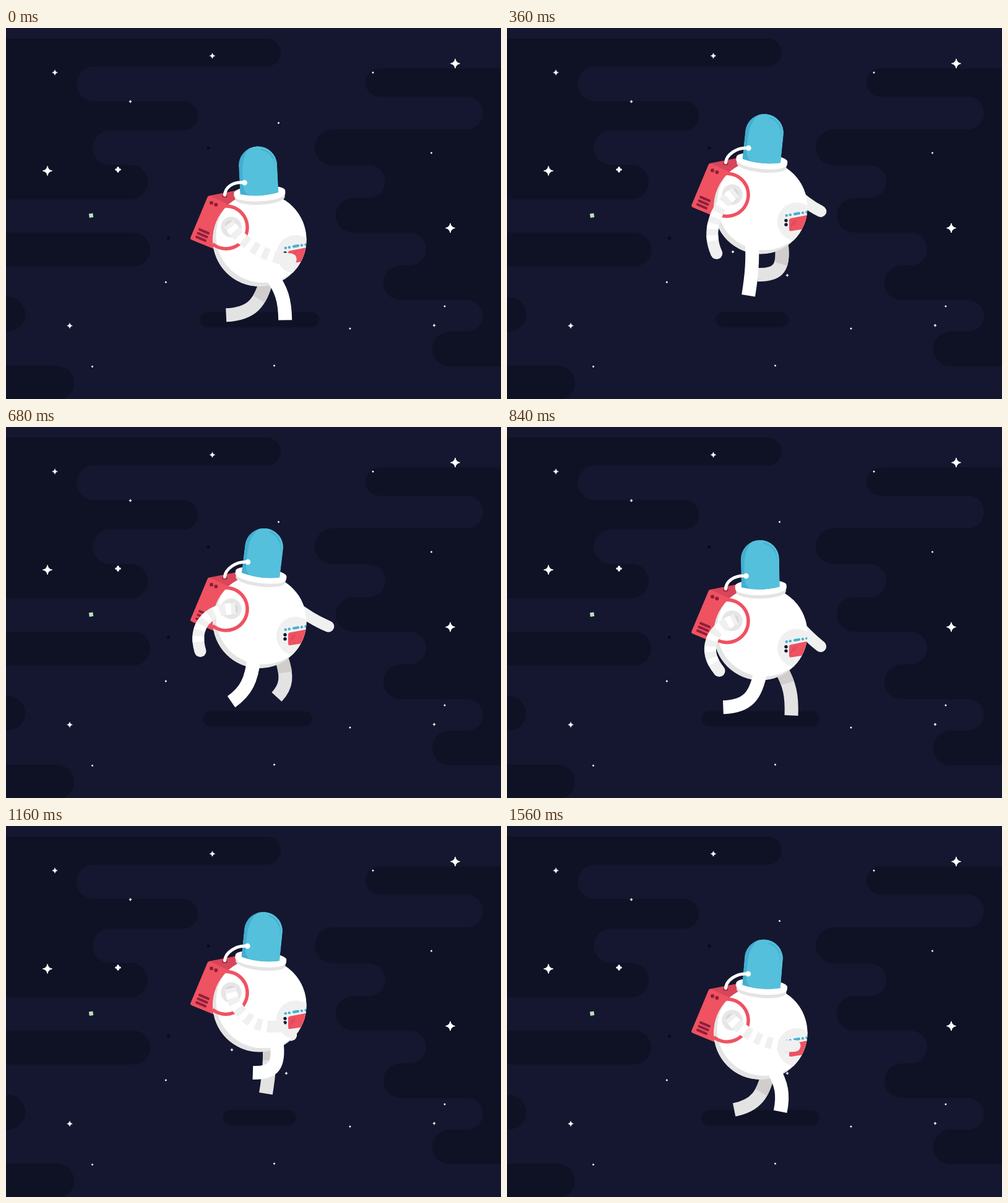
An HTML page that plays this animation: 800x600 px, repeating every 1600 ms.

```html
<!DOCTYPE html>
<html lang="en">
<head>
<meta charset="utf-8">
<title>Space walk</title>
<style>
  html, body { margin: 0; width: 100%; height: 100%; overflow: hidden; background: #14172f; }
  svg { display: block; width: 100%; height: 100%; }
  .line, .round { fill: none; }
  .round { stroke-linecap: round; }
</style>
</head>
<body>
<svg viewBox="0 0 800 600">
  <defs>
    <clipPath id="bodyClip"><circle cx="409.7" cy="342.5" r="75.8"/></clipPath>
    <clipPath id="hatClip"><path d="M379 222.5a31 31 0 0 1 62 0V267.5Q410 275 379 267.5Z"/></clipPath>
  </defs>
  <g id="clouds" fill="#0f1125"></g>
  <g id="stars" fill="#fff"></g>
  <g fill="#080a19"><circle cx="327" cy="194" r="2.5"/><circle cx="262.5" cy="340" r="2.5"/></g>
  <rect x="134.3" y="300" width="6.5" height="6.5" fill="#b9dfb6" transform="rotate(-8 137.5 303.3)"/>
  <rect id="shadow" y="459.5" height="24.5" rx="12.25" fill="#0f1125"/>

  <g id="hero">
    <path id="farArm" class="round" stroke="#f0f0f0" stroke-width="18.5"/>
    <path id="farLeg" class="line" stroke="#e4e3e3" stroke-width="22"/>
    <path id="farLegShade" class="line" stroke="#d0cdcc" stroke-width="22"/>

    <!-- backpack -->
    <path d="M328 271.5L380 261.5 392 282 357 290Z" fill="#d8465a"/>
    <path d="M330 272L358 285 348 361 334.5 357 300.5 343Q297 341.5 298.5 338.5L325.5 274Q327 270.5 330 272Z" fill="#ef5261"/>
    <g fill="#8f1f3b">
      <circle cx="332" cy="283" r="3"/><circle cx="339.3" cy="286" r="3"/>
      <ellipse cx="353.5" cy="272" rx="4" ry="2.5"/>
    </g>
    <path class="round" d="M313 326l14 6M310.5 332l14 6M308 338l14 6" stroke="#8f1f3b" stroke-width="4"/>

    <!-- body -->
    <g clip-path="url(#bodyClip)">
      <circle cx="409.7" cy="342.5" r="76" fill="#e4e4e4"/>
      <circle cx="415.5" cy="336" r="76" fill="#fff"/>
      <circle cx="468" cy="366" r="31" fill="#f0f0f0"/>
      <path d="M456 363.5q0-2.5 2.5-3L492 354V376L459 381q-3 .5-3-2.5Z" fill="#ef5261"/>
      <path class="line" d="M459 374l5-10M463 372l5-9" stroke="#d8465a" stroke-width="1.5"/>
      <g fill="#45b2d2">
        <circle cx="451.8" cy="355.8" r="2.2"/><circle cx="457.8" cy="354.8" r="2.2"/>
        <circle cx="478" cy="351.5" r="2.2"/><circle cx="484.5" cy="350.5" r="2.2"/>
      </g>
      <path class="round" d="M465 353.5l7-1.2" stroke="#45b2d2" stroke-width="4.2"/>
      <g fill="#14172f"><circle cx="451" cy="364" r="2.7"/><circle cx="451" cy="370.7" r="2.7"/></g>
    </g>
    <path class="line" d="M343.7 290.1A34.5 34.5 0 1 1 334 349.5" stroke="#ef5261" stroke-width="5.5"/>
    <path id="nearLeg" class="line" stroke="#fff" stroke-width="22"/>

    <g id="head">
      <path d="M370.5 268H451V275A40.25 11 0 0 1 370.5 275Z" fill="#e4e4e4"/>
      <path d="M369 265A41.5 10 0 0 1 452 265V269.5A41.5 11 0 0 1 369 269.5Z" fill="#fff"/>
      <g clip-path="url(#hatClip)">
        <rect x="375" y="188" width="70" height="90" fill="#43aed0"/>
        <path d="M404 188Q385 202 384.5 232V254Q385 269 402 274H445V188Z" fill="#55c0dc"/>
        <path class="line" d="M416 196.5A26 26 0 0 1 435.5 213" stroke="#43aed0" stroke-width="2"/>
        <path class="line" d="M436 214.5A26 26 0 0 1 437 224" stroke="#43aed0" stroke-width="1.6" stroke-dasharray="1.5"/>
      </g>
    </g>
    <path id="hose" class="round" stroke="#fff" stroke-width="5"/>
    <circle id="plug" r="4.4" fill="#fff"/>

    <circle cx="364" cy="322" r="16.7" fill="#e6e6e6"/>
    <circle cx="364" cy="322" r="10.5" fill="#d6d6d6"/>
    <path id="arm" class="line" stroke="#f0f0f0" stroke-width="19"/>
    <circle id="hand" r="9.5" fill="#f0f0f0"/>
    <path id="stripes" class="line" stroke="#fff" stroke-width="19" stroke-dasharray="0 7 9 10 9 10 9 10 9 10 9 300"/>
  </g>
</svg>
<script>
const LOOP = 1600, STEP = LOOP / 2;
const $ = id => document.getElementById(id);
const set = (id, attrs) => {
  for (const k in attrs) $(id).setAttribute(k, attrs[k]);
};

// A cloud grows from a side of the stage; its rows end in turn in a bulge and a notch.
function cloud(side, ys, ends) {
  const right = side > 400;
  let d = `M${side} ${ys[0]}`;
  ends.forEach((end, i) => {
    const r = (ys[i + 1] - ys[i]) / 2, notch = i % 2 === 1;
    d += `H${end + (right === notch ? -r : r)}a${r} ${r} 0 0 ${right === notch ? 1 : 0} 0 ${2 * r}`;
  });
  return `<path d="${d}H${side}Z"/>`;
}
$('clouds').innerHTML =
  cloud(860, [65.5, 111, 164, 222, 275, 331, 384, 440, 491, 547], [581, 771, 499, 613, 533, 679, 610, 771, 689]) +
  cloud(-60, [17, 62.5, 118, 166, 221.5, 277], [444, 114, 310, 140, 229]) +
  cloud(-60, [331, 385.5], [233]) + cloud(-60, [435, 491], [31]) + cloud(-60, [546, 602], [110]);

const spark = r => ([x, y]) =>
  `<path transform="translate(${x} ${y}) scale(${r})" d="M0-1Q.16-.16 1 0 .16.16 0 1-.16.16-1 0-.16-.16 0-1Z" stroke="#fff" stroke-width=".13" stroke-linejoin="round"/>`;
const dot = ([x, y]) => `<circle cx="${x}" cy="${y}" r="1.5"/>`;
$('stars').innerHTML = [
  ...[[726, 57.5], [67, 231], [718, 323.5]].map(spark(7.6)),
  ...[[79, 72], [333.5, 45], [103, 481.5]].map(spark(4.3)),
  ...[[201, 119], [692, 481], [453, 400], [365, 362]].map(spark(2.4)),
  ...[[593, 72], [440.5, 153.5], [687.5, 202], [258.3, 411], [139.5, 547.5], [433.5, 546], [556, 486], [709, 450]].map(dot),
  '<path d="M181 226v6M178 229h6" stroke="#fff" stroke-width="3.6" stroke-linecap="round"/>'
].join('');

const rad = deg => deg * Math.PI / 180;
const smooth = u => u * u * (3 - 2 * u);

function bezierEase(x1, y1, x2, y2, x) {
  const at = (a, b, s) => 3 * s * (1 - s) * ((1 - s) * a + s * b) + s ** 3;
  let lo = 0, hi = 1;
  for (let i = 0; i < 24; i++) {
    const mid = (lo + hi) / 2;
    if (at(x1, x2, mid) < x) lo = mid; else hi = mid;
  }
  return at(y1, y2, lo);
}

// The foot snaps to a turn at each landing (kick) and sways in between.
function leg(t, far) {
  const turn = 2 * Math.PI * t / LOOP, sin = Math.sin(turn), cos = Math.cos(turn);
  const wave = 2 * Math.abs(1 - t / STEP) - 1, kick = wave * Math.abs(wave);
  const shift = far ? 18 + 12 * sin : 0;
  const x = (mid, reach, sway) => mid + reach * kick - sway * sin + shift;
  const hip = x(416.5, 12, 21), bend = x(421, 30, 24), foot = x(394.5, 57, 5);
  const bendY = 446 - 16 * kick - 7 * sin, footY = 468.5 + 16.5 * sin + 4 * cos;
  const mix = (a, b) => a + (b - a) * .75;
  return {
    d: `M${hip} 400C${mix(hip, bend)} ${mix(400, bendY)} ${mix(foot, bend)} ${mix(footY, bendY)} ${foot} ${footY}`,
    shade: 33 - 8 * cos
  };
}

// The near arm swings around the shoulder and bends more as its reach shrinks.
function drawArms(turn) {
  const swing = Math.cos(turn + Math.PI / 4);
  const angle = rad(70 - 59 * swing), reach = 96.5 + 13 * Math.cos(turn);
  const bow = 17 + .65 * (108 - reach);
  const sin = Math.sin(angle), cos = Math.cos(angle);
  const at = (along, out) => [364 + along * cos - out * sin, 322 + along * sin + out * cos];
  const a = at(.26 * reach, .85 * bow), b = at(.68 * reach, 1.12 * bow), hand = at(reach, 0);
  const back = 7 / Math.hypot(a[0] - 364, a[1] - 322);
  const d = `M${364 - (a[0] - 364) * back} ${322 - (a[1] - 322) * back}L364 322C${a} ${b} ${hand}`;
  set('arm', { d });
  set('stripes', { d });
  set('hand', { cx: hand[0], cy: hand[1] });

  const x = 484 - 39 * swing, y = 370 - 25 * Math.cos(turn - 2);
  set('farArm', { d: `M450 305Q${x / 2 + 228} ${y / 2 + 162} ${x} ${y}` });
}

// The head jerks back on landing and nods forward slowly.
function drawHead(v) {
  const tilt = 20 * v ** .8 * (1 - v) ** .3 - 3;
  set('head', { transform: `rotate(${tilt} 410 280)` });
  const sin = Math.sin(rad(tilt)), cos = Math.cos(rad(tilt));
  const x = 410 - 23 * cos + 31 * sin, y = 280 - 23 * sin - 31 * cos;
  set('plug', { cx: x, cy: y });
  set('hose', { d: `M353.5 270.5C354 258 ${x - 19} ${y - 2} ${x} ${y}` });
}

function draw(t) {
  const v = t % STEP / STEP, up = 1 - Math.abs(2 * v - 1);
  set('hero', { transform: `translate(0 ${-53 * bezierEase(.167, .167, .35, 1, up)})` });

  const shrink = smooth(up), drift = t < STEP ? 14 * shrink : 0;
  set('shadow', { x: 313.3 + 38.5 * shrink - drift, width: 192.7 - 77 * shrink });

  drawHead(v);
  drawArms(2 * Math.PI * t / LOOP);
  set('nearLeg', { d: leg(t).d });
  const { d, shade } = leg((t + STEP) % LOOP, true);
  set('farLeg', { d });
  set('farLegShade', { d, 'stroke-dasharray': `${shade} 300` });
}

function frame() {
  draw(performance.now() % LOOP);
  requestAnimationFrame(frame);
}
frame();
</script>
</body>
</html>
```
